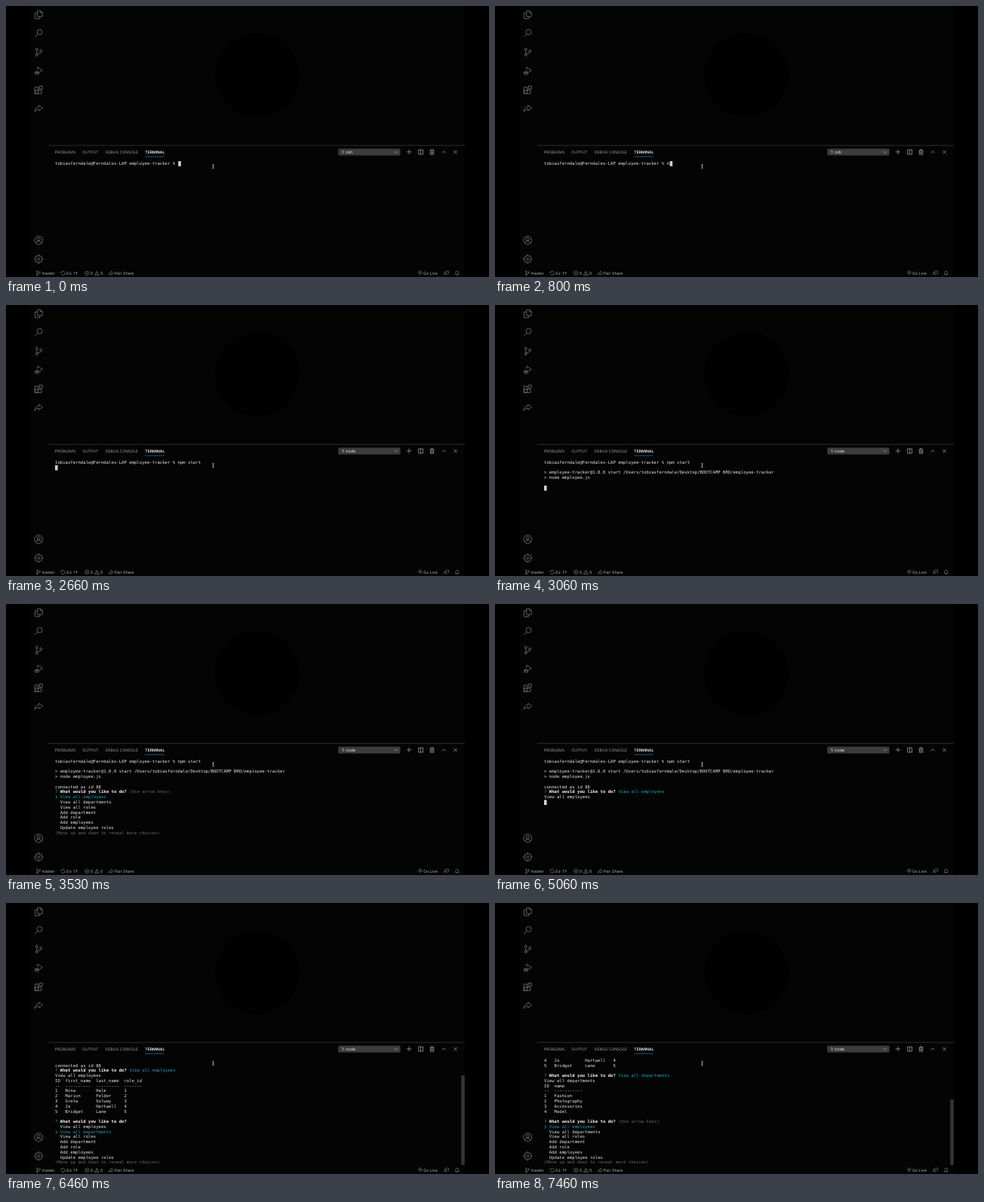
These frames come from a looping animation (640x360 px, 8000 ms). An HTML page:

```html
<!DOCTYPE html>
<html lang="en">
<head>
<meta charset="utf-8">
<title>Employee tracker terminal</title>
<style>
  html, body { margin: 0; width: 100%; height: 100%; overflow: hidden; background: #000; }
  svg { display: block; width: 640px; height: 360px; }
  text { text-rendering: geometricPrecision; white-space: pre; }
  .ui { font-family: Inter, Roboto, sans-serif; fill: #b4b4b4; }
  .tabs { font-size: 5.05px; fill: #a0a0a0; }
  .tabs .on { fill: #f4f4f4; font-weight: 600; }
  .status { font-size: 5.25px; }
  .term { font: 5.647px "DejaVu Sans Mono", monospace; fill: #e6e6e6; }
  .term .b { font-weight: bold; fill: #f4f4f4; }
  .term .c { fill: #11a8cd; }
  .term .g { fill: #0dbc79; }
  .term .d { fill: #6a6a6a; }
  .icons { fill: none; stroke: #7c7c7c; stroke-width: 1.5; stroke-linejoin: round; }
  .small { fill: none; stroke: #b8b8b8; stroke-width: .65; }
  .dim { stroke: #a0a0a0; stroke-width: .5; }
</style>
</head>
<body>
<svg viewBox="0 0 640 360" xmlns="http://www.w3.org/2000/svg">
  <rect width="640" height="360" fill="#000"/>
  <rect x="32" width="576" height="360" fill="#040404"/>
  <circle cx="333" cy="92" r="56" fill="#010101"/>
  <path d="M56 185.2H608" stroke="#303030" stroke-width=".9"/>

  <g class="icons" id="activity"></g>

  <g class="ui tabs">
    <text x="64.8" y="196">PROBLEMS</text>
    <text x="101.3" y="196">OUTPUT</text>
    <text x="131.8" y="196">DEBUG CONSOLE</text>
    <text x="184.3" y="196" class="on">TERMINAL</text>
  </g>
  <path d="M184.2 200.1H209.8" stroke="#0b76b4" stroke-width=".8"/>

  <rect x="440.3" y="189.6" width="82.2" height="9" rx="1.4" fill="#3c3c3c"/>
  <text id="shell" class="ui" x="445.2" y="196.1" font-size="5.3" style="fill:#ededed"></text>
  <g class="small">
    <path d="M514.6 193l2.1 2.1 2.1-2.1"/>
    <path d="M530.8 193.8h6.4M534 190.6v6.4"/>
    <path d="M546.6 191h5.9v6h-5.9zM549.6 191v6"/>
    <path d="M561.6 191.9h5.8M563.5 191.8v-1h2v1M562.3 192v5.2h4.4V192M563.8 193.2v3M565.2 193.2v3"/>
    <path d="M577.6 195.2l2.4-2.4 2.4 2.4"/>
    <path d="M593.2 191.7l4.6 4.6M597.8 191.7l-4.6 4.6"/>
  </g>

  <g class="small dim">
    <circle cx="41.4" cy="352.8" r=".9"/><circle cx="41.4" cy="357.2" r=".9"/><circle cx="44.7" cy="353.6" r=".9"/>
    <path d="M41.4 353.7v2.6M44.7 354.5c0 1.400-1.500 1.300-3.200 1.500"/>
    <path d="M73.2 354.2a2.6 2.6 0 0 1 4.9-.4M78 355.6a2.6 2.6 0 0 1-4.9.5M72 353.4l1.1 1.2 1.2-1M76.9 356.3l1.1-1.1 1.2 1.2"/>
    <circle cx="107.3" cy="354.9" r="2.7"/>
    <path d="M106.2 353.8l2.2 2.2M108.4 353.8l-2.2 2.2"/>
    <path d="M120.3 352.2l3 5.3h-6zM120.3 354v1.8M120.3 356.3v.6"/>
    <path d="M139.6 352.4l3 2.4-3 2.4v-1.4c-1.6 0-2.4.4-3.1 1.6 0-2.4 1.2-3.6 3.1-3.6z"/>
    <circle cx="548.8" cy="354.5" r=".7"/>
    <path d="M548.8 355.3v2.3M547.3 356a2.3 2.3 0 1 1 3 0"/>
    <circle cx="582" cy="354.4" r="1.1"/>
    <path d="M580 357.6c.2-2.600 3.800-2.600 4 0M582.400 352.200h4.200v3h-1.200l-1.200 1.200"/>
    <path d="M595.2 356.6l.7-1.2v-1.2a1.7 1.9 0 0 1 3.6 0v1.2l.7 1.2zM597 357.4h1.4"/>
  </g>
  <g class="ui status">
    <text x="47.6" y="356.9">master</text>
    <text x="80" y="356.9">0↓</text>
    <text x="89.3" y="356.9">1↑</text>
    <text x="111.8" y="356.9">0</text>
    <text x="125" y="356.9">0</text>
    <text x="144" y="356.9">Pair Share</text>
    <text x="553" y="356.9">Go Live</text>
  </g>

  <g class="term" id="rows" xml:space="preserve"></g>
  <rect id="caret" width="3.6" height="6.7" fill="#d0d0d0"/>
  <rect id="thumb" x="603.2" width="4.6" fill="#343434"/>
  <path d="M273.4 210.3q1.1 0 1.1.8v4q0 .8-1.1.8M275.6 210.3q-1.1 0-1.1.8v4q0 .8 1.1.8" fill="none" stroke="#c4c4c4" stroke-width=".7"/>
</svg>
<script>
const $ = id => document.getElementById(id);
const LOOP = 8000, LEFT = 65, TOP = 205.7, CELL = 3.4, LINE = 6.775;

// Activity bar icons on a 24-unit grid: [centre y, markup]
const ring = (x, y, r) => `<circle cx="${x}" cy="${y}" r="${r}"/>`;
const path = d => `<path d="${d}"/>`;

function gear(teeth) {
  const step = Math.PI * 2 / teeth;
  const point = (r, a) => `${12 + r * Math.cos(a)} ${12 + r * Math.sin(a)}`;
  const outline = Array.from({ length: teeth }, (_, i) =>
    [[8, -.3], [11, -.2], [11, .2], [8, .3]].map(([r, k]) => point(r, (i + k) * step)).join('L'));
  return path('M' + outline.join('L') + 'z') + ring(12, 12, 3);
}

$('activity').innerHTML = [
  [11.6, path('M9 1.5h8l5 5V17H9zM17 1.5v5h5M9 7H2.5v15.5H15V17')],
  [36.2, ring(14.5, 9, 7) + path('M9.5 14L2 22')],
  [61.3, ring(7, 4.5, 3) + ring(7, 19.5, 3) + ring(18, 9, 3) + path('M7 7.5v9M18 12c0 4-6 3-10.5 4.8')],
  [86.2, path('M9 9V2l13 8.5-9 6M3.5 13l2 1.5M11.5 13l-2 1.5M1 17.5h2.5M11.5 17.5H14M2.5 22.5l2-2M12.5 22.5l-2-2M3.5 16.5h8') + ring(7.5, 17.5, 4)],
  [111.3, path('M2 5h8.7v17H2zM2 13.5h17.5V22H2zM14 2h8v8h-8z')],
  [136.3, path('M13 3l9.5 7.5-9.5 7.5v-4.500c-5 0-8 1.500-11 6.500C2 12 6 7.500 13 7.500z')],
  [311.2, ring(12, 12, 11) + ring(12, 9.3, 4) + path('M4.5 20c1-4 4-5.8 7.5-5.8s6.5 1.8 7.5 5.8')],
  [336.2, gear(8)]
].map(([y, art]) => `<g transform="translate(43.3 ${y}) scale(.5) translate(-12 -12)">${art}</g>`).join('');

// A row is a list of [column, class, text]
const seg = (col, cls, s) => [col, cls, s];
const plain = s => [seg(0, '', s)];
const blank = [];
const table = lines => lines.map(plain);

const views = ['employees', 'departments', 'roles'].map(n => 'View all ' + n);
const options = [...views, 'Add department', 'Add role', 'Add employees', 'Update employee roles'];
const ask = (cls = '', tail = '') =>
  [seg(0, 'g', '?'), seg(2, 'b', 'What would you like to do?'), seg(29, cls, tail)];
const menu = (pick, hint) => [
  ask('d', hint ? '(Use arrow keys)' : ''),
  ...options.map((o, i) => i === pick ? [seg(0, 'c', '❯'), seg(2, 'c', o)] : [seg(2, '', o)]),
  [seg(0, 'd', '(Move up and down to reveal more choices)')]
];

const user = 'tobiasferndale';
const prompt = `${user}@Ferndales-LAP employee-tracker % `;
const command = 'npm start';
const started = [
  plain(prompt + command), blank,
  plain(`> employee-tracker@1.0.0 start /Users/${user}/Desktop/BOOTCAMP BRO/employee-tracker`),
  plain('> node employee.js'), blank
];
const connected = plain('connected as id 88');
const answer = i => [ask('c', views[i]), plain(views[i])];
const staff = table([
  'ID  first_name  last_name  role_id',
  '--  ----------  ---------  -------',
  '1   Nina        Hale       1',
  '2   Marion      Felder     2',
  '3   Greta       Solway     3',
  '4   Jo          Hartwell   4',
  '5   Bridget     Lane       5'
]);
const departments = table([
  'ID  name', '--  -----------',
  '1   Fashion', '2   Photography', '3   Accessories', '4   Model'
]);
const staffView = [blank, connected, ...answer(0), ...staff, blank];

const typed = [0, 800, 1000, 1060, 1330, 1460, 1530, 1660, 1800, 2000].map((at, n) => ({
  at, rows: [plain(prompt + command.slice(0, n))], caret: [prompt.length + n, 0], shell: 'zsh'
}));
const states = [
  ...typed,
  { at: 2530, rows: started.slice(0, 1), caret: [0, 1], shell: 'zsh' },
  { at: 2660, rows: started.slice(0, 1), caret: [0, 1] },
  { at: 3060, rows: started, caret: [0, 5] },
  { at: 3530, rows: [...started, connected, ...menu(0, true)] },
  { at: 5060, rows: [...started, connected, ...answer(0)], caret: [0, 8] },
  { at: 5200, rows: [...staffView, ...menu(0, true)], thumb: 229 },
  { at: 6460, rows: [...staffView, ...menu(1, false)], thumb: 229 },
  { at: 7460, rows: [...staff.slice(-2), blank, ...answer(1), ...departments, blank, ...menu(0, true)], thumb: 261 }
];

const drawRow = (row, r) => row.map(([col, cls, s]) =>
  `<text class="${cls}" x="${LEFT + col * CELL}" y="${TOP + r * LINE + 5.1}">${s.replace(/>/g, '&gt;')}</text>`).join('');

function show({ rows, caret, shell = 'node', thumb }) {
  $('rows').innerHTML = rows.map(drawRow).join('');
  $('shell').textContent = '1: ' + shell;
  $('caret').style.display = caret ? '' : 'none';
  if (caret) {
    $('caret').setAttribute('x', LEFT + caret[0] * CELL);
    $('caret').setAttribute('y', TOP + caret[1] * LINE + .4);
  }
  $('thumb').style.display = thumb ? '' : 'none';
  if (thumb) {
    $('thumb').setAttribute('y', thumb);
    $('thumb').setAttribute('height', 348 - thumb);
  }
}

const start = performance.now();
let current;
function tick() {
  const t = (performance.now() - start) % LOOP;
  const next = states.findLast(s => s.at <= t) || states[0];
  if (next !== current) show(current = next);
  requestAnimationFrame(tick);
}
tick();
</script>
</body>
</html>
```
